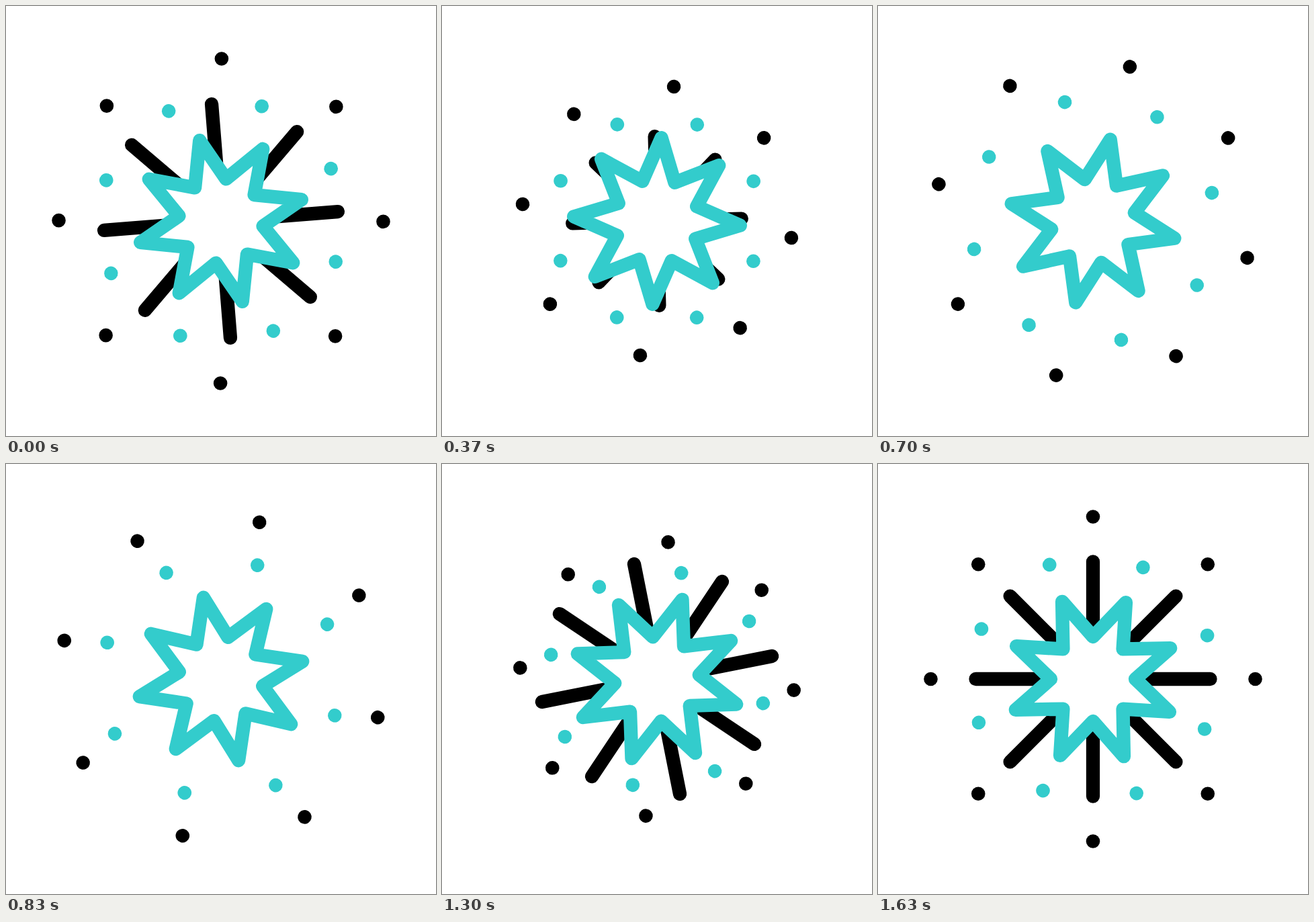
Write an HTML page that moves like this. It is 640x640 px and loops after 1670 ms.

```html
<!DOCTYPE html>
<html lang="en">
<head>
<meta charset="utf-8">
<title>Spinning burst</title>
<style>
  html, body { margin: 0; height: 100%; overflow: hidden; background: #fff; }
  svg { display: block; width: 100%; height: 100%; }
</style>
</head>
<body>
<svg viewBox="-320 -320 640 640" fill="none" stroke-width="20.3" stroke-linecap="round" stroke-linejoin="round">
  <g id="rays" stroke="#000"></g>
  <path id="star" fill="#fff" stroke="#3cc"/>
  <g id="outerDots" fill="#000"></g>
  <g id="innerDots" fill="#3cc"></g>
</svg>
<script>
const LOOP = 1670, FRAME = 100 / 3, ARMS = 8;
// Slightly uneven pacing: [frame, progress through the turn]
const PACE = [[0, .0255], [5, .136], [17, .381], [25, .5355], [32, .678], [39, .8125], [49, 1]];

const byId = id => document.getElementById(id);
const rays = byId('rays'), star = byId('star');
const outerDots = byId('outerDots'), innerDots = byId('innerDots');

const phase = (p, from, to) => Math.min(1, Math.max(0, (p - from) / (to - from)));
const ease = x => (1 - Math.cos(Math.PI * x)) / 2;
const bump = x => Math.sin(Math.PI * x) ** 2;
const rotate = (el, deg) => el.setAttribute('transform', `rotate(${deg})`);

// Angles run clockwise from the top.
function polar(deg, r) {
  const a = deg * Math.PI / 180;
  return `${(r * Math.sin(a)).toFixed(2)} ${(-r * Math.cos(a)).toFixed(2)}`;
}

function ring(parent, tag, attrs) {
  for (let i = 0; i < ARMS; i++) {
    const el = document.createElementNS('http://www.w3.org/2000/svg', tag);
    for (const name in attrs) el.setAttribute(name, attrs[name]);
    rotate(el, i * 360 / ARMS);
    parent.append(el);
  }
}

function setAll(parent, name, value) {
  for (const el of parent.children) el.setAttribute(name, value);
}

function progressAt(frame) {
  const i = Math.max(1, PACE.findIndex(([f]) => f >= frame));
  const [f0, p0] = PACE[i - 1], [f1, p1] = PACE[i];
  return p0 + (p1 - p0) * (frame - f0) / (f1 - f0);
}

function draw(p) {
  rotate(star, 270 * p);

  const shown = 1 - ease(phase(p, .15, .39)) + ease(phase(p, .525, .8));
  setAll(rays, 'y2', -60 - 114.5 * shown);
  rotate(rays, -180 * p);

  const innerDip = bump(phase(p, 0, .47)) + bump(phase(p, .47, .98));
  setAll(innerDots, 'cy', -182 + 27.3 * innerDip);
  rotate(innerDots, 24.15 - 180 * p);

  const outerDip = bump(phase(p, .022, .51)) + bump(phase(p, .51, 1));
  setAll(outerDots, 'cy', -241.5 + 40 * (1 - Math.max(0, 1 - outerDip) ** 1.3));
  const swing = phase(p, 0, .51) - phase(p, .51, 1);
  rotate(outerDots, 14 * (.8 * ease(swing) + .2 * swing));
}

ring(rays, 'line', { y1: -60 });
ring(outerDots, 'circle', { r: 10.3 });
ring(innerDots, 'circle', { r: 10.3 });
const corners = [];
for (let i = 0; i < ARMS; i++) {
  corners.push(polar(i * 45, 63), polar(i * 45 + 23.25, 124));
}
star.setAttribute('d', `M${corners.join('L')}Z`);

const start = performance.now();
function tick() {
  const t = (performance.now() - start) % LOOP;
  draw(progressAt(Math.min(49, Math.floor((t + 3.4) / FRAME))));
  requestAnimationFrame(tick);
}
tick();
</script>
</body>
</html>
```
